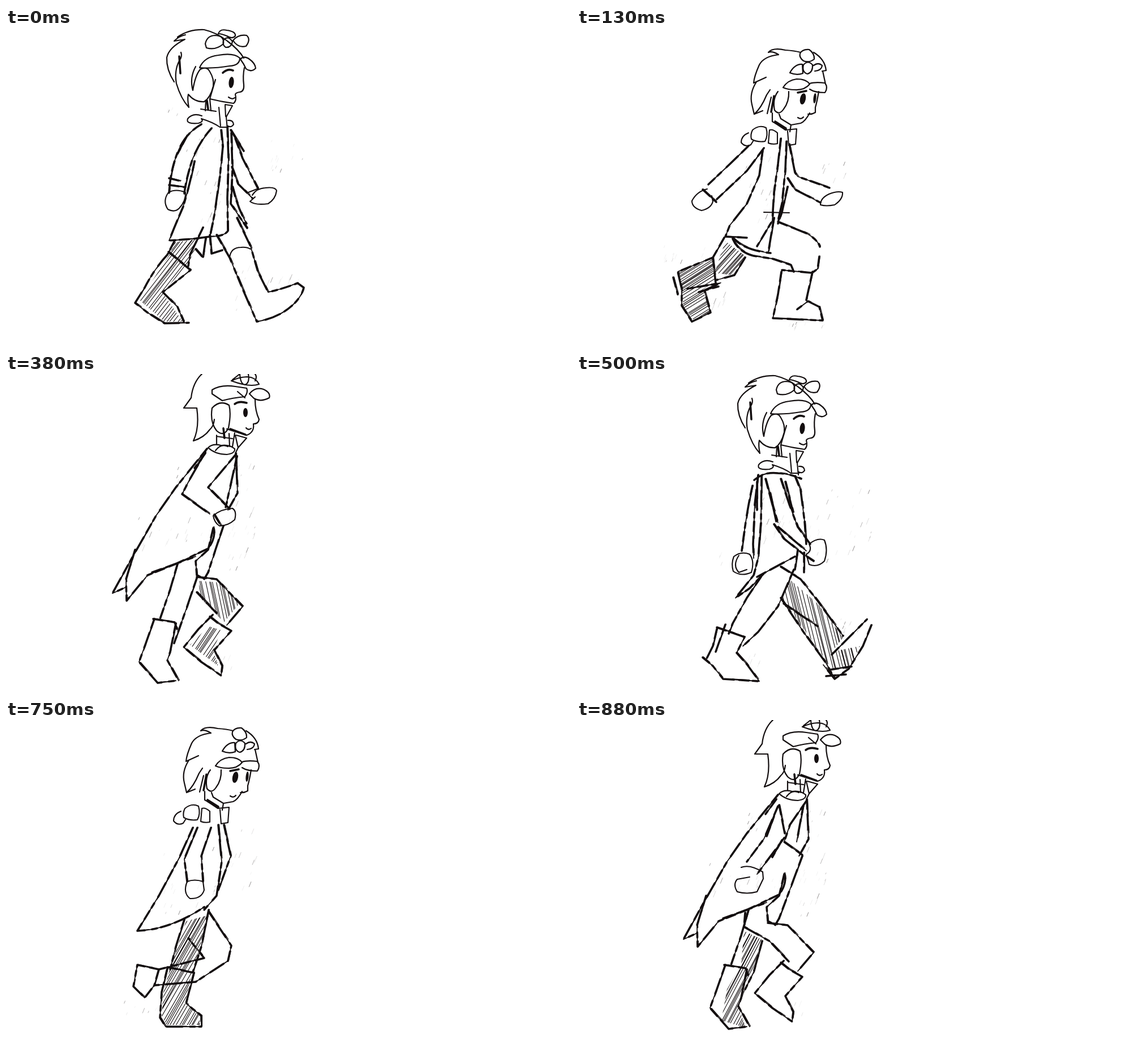
Write an HTML page with a canvas that moves like this. It is 998 px wide and 561 px high and loops after 1 s.

```html
<!DOCTYPE html>
<html lang="en">
<head>
<meta charset="utf-8">
<title>Walk cycle</title>
<style>
html, body { margin: 0; width: 100%; height: 100%; overflow: hidden; background: #fff; }
canvas { display: block; }
</style>
</head>
<body>
<canvas id="stage" width="998" height="561"></canvas>
<script>
const ctx = document.getElementById('stage').getContext('2d');
const INK = '#130e0f';
const STARTS = [0, 130, 250, 380, 500, 630, 750, 880];
const LOOP = 1000;

// Heads: clean outlines, thick brows, eyes as [x, y, rx, ry, tilt]
const tallHead = {
  hair: `M317,12Q306,14 297,23L316,20Q288,34 284,52Q283,73 297,95M303,16Q323,2 350,3Q372,8 391,23Q411,38 420,53
    M309,43Q312,50 306,58Q297,75 301,98Q309,125 323,140Q320,126 322,117Q333,131 350,130
    M342,70Q350,51 375,48Q402,43 413,53Q413,66 395,67Q365,72 342,70M414,55Q420,48 430,55Q440,62 441,71Q433,79 424,72Q420,63 414,55
    M335,68Q324,88 330,110Q334,84 343,73Q355,67 360,77Q368,90 366,103Q361,123 350,130`,
  flower: `M352,28Q355,13 370,13Q386,14 384,28Q370,40 354,35ZM384,22Q392,12 400,24Q398,35 388,34Q382,30 384,22
    M401,22Q410,11 425,13Q433,20 424,32Q410,36 401,22M375,10Q378,1 390,4Q406,6 405,14Q400,20 390,14Q380,10 375,10`,
  face: `M421,70Q418,85 420,100Q421,112 413,113Q406,114 405,117Q408,128 402,133Q380,130 360,125M393,122Q400,127 404,123
    M360,125L362,146M353,128L352,146M344,143L371,147M370,91L360,125`,
  brow: 'M383,79Q392,71 401,75M306,50L308,80M355,128L357,143',
  eyes: [[398, 96, 4.5, 10, .1]]
};
const lowHead = {
  hair: `M356,47Q345,40 338,43Q346,34 368,39Q384,40 395,43M418,43Q438,55 440,75L433,76M434,76L439,99
    M356,47Q330,50 322,65Q313,85 312,97L334,87M317,95Q304,115 309,135L313,152Q325,142 335,118L341,109M313,152L328,146M343,122L336,151
    M364,105Q372,92 388,90Q405,90 411,99Q402,110 385,109Q373,109 364,105M411,98Q420,95 438,97Q444,105 438,114Q420,114 411,108
    M355,112Q345,125 349,145Q357,155 365,143Q375,130 374,112`,
  flower: `M394,45Q398,37 410,38Q420,45 419,55Q410,62 400,58Q392,52 394,45M400,65Q408,56 416,65Q417,78 407,81Q397,78 400,65
    M376,79Q385,63 398,64L399,80Q388,84 376,79M418,66Q426,60 433,66Q432,75 420,76`,
  face: `M427,112Q424,130 421,140L421,149Q414,153 408,152M390,158Q396,162 400,157M411,150Q403,165 395,168L378,171L360,160L357,152
    M345,150L345,165L370,179M378,171L376,183`,
  brow: 'M390,114L405,111M348,120L343,148M350,165L369,177',
  eyes: [[399, 125, 5, 10, .2], [420, 124, 2.5, 9, .1]]
};
const highHead = {
  hair: `M346,0Q330,15 327,42L314,60L337,60Q342,95 331,118Q350,112 360,98Q367,92 368,80
    M364,28Q380,18 405,22L425,25Q428,32 422,40Q400,42 382,47L364,35ZM430,35Q440,22 455,27Q468,33 465,42Q450,50 438,43Z
    M364,60Q360,85 372,100Q385,112 393,95Q398,70 394,55Q378,45 364,60M409,31L422,42`,
  flower: 'M398,12Q410,6 425,5Q440,5 447,18Q430,24 398,12M413,0Q414,18 422,19Q431,16 428,0M400,10L413,0M440,0Q444,5 440,12',
  face: `M440,45Q440,65 447,80Q446,88 437,88Q439,103 425,108L390,97M424,95Q428,100 433,96
    M384,95L385,113M394,105L395,128M372,108L372,125M404,104L400,128M372,110L400,114M407,108L425,113L410,130L405,140M410,130L405,108
    M357,130Q365,122 380,126Q395,124 404,132Q405,140 390,142Q370,142 357,130M370,135Q380,122 392,128`,
  brow: 'M404,53Q412,47 425,51M384,96L386,113M396,97L423,107',
  eyes: [[423, 68, 4, 8, 0]]
};

// Shared clothing and limbs
const tallCollar = `M387,135L400,137L389,157L391,178M387,136L388,156M376,140L379,173M346,155Q330,149 321,160Q317,170 340,168Q350,165 345,160
  Q365,166 378,175L392,175M392,163Q401,162 402,170Q398,177 390,172`;
const lowCollar = `M303,185Q290,190 290,202Q297,211 307,206L312,198M310,180Q322,170 334,176Q338,190 332,200Q318,202 308,196Q306,188 310,180
  M340,180L338,203Q346,206 354,204L354,185Q346,178 340,180M350,168L368,180L388,178L386,205L374,207L372,182`;
const cape = `M355,132L300,200L265,250L225,320L188,387L212,376M228,310L212,362L213,400L250,355L300,335L357,308Q372,288 366,270
  M258,350L335,322M406,140L409,210L392,240M352,140L333,166`;
const highLegs = `M303,335L290,380L272,432M260,432L298,438L302,450M262,432L247,475L235,508L268,545L300,541M300,440L290,490L285,505L305,541
  M337,358L372,362L418,410L390,443M360,428L375,440L398,453L368,487M365,425L340,450L314,482L345,508L380,532L382,515L368,487
  M366,272L357,310L335,330L337,355L350,362L357,350`;
const passLegs = `M315,352L300,400L290,440M358,335L345,400L330,445M285,436L332,446M285,438L275,480L272,525L282,541L345,541M332,446L318,500L345,522L345,541
  M358,338L398,398L392,425L335,462L262,468L245,490L225,470L232,432L270,440L350,420L322,385M270,440L262,468`;
const passCoat = `M330,190L305,245L270,310L232,372Q290,370 350,330M375,185L381,250L372,310L350,335M385,185L397,240L375,300`;
const passSleeve = 'M338,190L315,245L320,285M362,190L345,240L348,285';
const passHand = 'M320,285Q312,305 325,315Q345,316 350,300L348,285Q333,280 320,285';
const highSmudge = [[395, 155, 45, 190, 28], [235, 240, 120, 90, 16], [300, 150, 20, 50, 6], [370, 490, 30, 30, 4]];

// head + offset, clean lines, rough lines, hatched areas [polygon, angle, gap], smudges [x, y, w, h, count]
const poses = [
  {
    head: tallHead,
    line: [tallCollar, `M287,290Q276,305 286,320Q298,326 306,318Q318,305 317,290Q300,283 287,290
      M435,295Q442,283 458,282Q476,280 478,287Q476,302 463,310Q440,313 431,306L440,298M428,290L446,283M395,405Q397,387 415,387Q425,386 432,390`],
    rough: [`M345,170Q318,185 305,215Q290,250 288,292M363,177Q342,200 330,230Q318,265 315,292M288,265L308,270M288,277L317,281
      M333,235Q325,275 313,315Q300,345 288,375L330,372L360,368Q385,368 392,358M380,180L383,210L378,260L368,330L361,364M391,175L393,230L391,300L392,358
      M398,185L400,250L397,310L426,353M400,280Q410,320 425,345M397,180L420,217M405,195L418,230L445,283M399,245L410,275L435,300M320,190L303,222`,
      `M298,375L285,400Q262,425 245,458L228,485L250,502L280,521L323,520M348,352L325,400L322,420M287,395L326,427L277,466L303,492L314,518
      M372,365L395,405L420,465L443,518M408,335L432,385L445,430L463,466Q490,460 515,450L526,458Q522,475 505,490Q480,512 443,518
      M335,390L348,405L353,370M360,365L363,398L382,392`],
    hatch: [['298,378 343,372 320,420 276,466 312,518 280,518 236,480 290,398', -52, 5]],
    smudge: [[470, 190, 55, 60, 12], [320, 190, 60, 170, 22], [460, 432, 60, 18, 9], [285, 130, 20, 25, 4], [400, 400, 35, 100, 8]]
  },
  {
    head: lowHead,
    line: [lowCollar, `M230,284Q212,288 203,305Q203,317 220,322Q237,318 240,306L238,296
      M430,312Q430,300 445,293Q460,287 469,290Q470,302 455,312Q440,315 430,312M330,325L375,326`],
    rough: [`M303,208L270,240L232,276M330,212L300,252L247,302M222,285L246,307M328,215L322,260L300,310L270,348L262,368L300,370
      M275,370Q295,392 342,397M360,195L355,240L348,290L345,340L318,385M370,200L368,250L362,310L355,340M348,335L338,395
      M375,205L385,255L390,262L446,282M372,265L385,285L430,308M372,280L362,325L355,345`,
      `M355,342Q380,352 405,362Q425,373 429,386M275,372Q285,395 312,402L345,407L378,418L383,430M428,403L425,425L415,432L362,427
      M361,430L355,470L346,512L434,516L428,492L408,482L388,497M416,430L405,480M260,370L240,405L178,430L185,460L185,490L203,518L236,502L225,463L253,450L195,460
      M297,405L278,436L245,445M240,405L245,450M170,440L178,470M215,466L250,456`],
    hatch: [['262,376 297,402 275,436 243,432', -48, 5], ['178,432 240,407 245,445 222,462 236,502 205,514 188,490', -32, 5]],
    smudge: [[155, 380, 100, 30, 12], [420, 235, 55, 35, 7], [300, 225, 50, 130, 16], [240, 460, 30, 40, 7], [370, 515, 70, 12, 8]]
  },
  {
    head: lowHead, dx: 6, dy: -24,
    shifted: lowCollar,
    line: [passHand],
    rough: [passCoat, passSleeve, passLegs],
    hatch: [['355,345 395,400 388,424 335,460 262,466 245,487 228,470 234,435 270,442 350,421 325,388', -50, 5]],
    smudge: [[280, 220, 90, 120, 18], [400, 190, 45, 120, 10], [210, 490, 60, 40, 6]]
  },
  {
    head: highHead,
    line: ['M366,250Q380,238 400,237Q408,242 404,257Q392,268 377,268Q368,262 366,250'],
    rough: [cape, highLegs, `M352,138L325,185L311,212L360,247M405,143L357,200L395,238M408,145L388,235M368,248L380,268M384,268L370,310L357,350
      M337,360L320,410L297,475M337,385L372,422`],
    hatch: [['342,365 378,368 412,405 385,438 340,392', 78, 6], ['358,445 380,452 366,488 375,515 325,478', -56, 6]],
    smudge: highSmudge
  },
  {
    head: tallHead,
    line: [tallCollar, `M277,322Q290,312 305,318Q314,330 308,350Q290,358 276,348Q272,335 277,322M286,320Q274,338 286,350L300,345
      M410,300Q425,288 437,293Q444,310 437,330Q425,342 410,336L405,318Q416,312 410,300`],
    rough: [`M313,187Q330,172 355,175Q378,176 396,185M310,197Q300,240 291,312M320,178L314,230L311,300L312,325M326,180L325,260L320,325L312,355L280,395L305,378L330,352
      M318,358L385,322M333,185L345,230L355,262M341,210L352,260M360,185L375,230L390,270L412,300M348,265L365,290L400,318L418,330M355,270L405,312
      M385,180L395,205L402,260L405,300M390,310L385,345M401,315L401,350M368,190L382,245M318,190L318,240`,
      `M325,358L300,395L275,440L268,458M383,345L355,410L320,455L293,480M247,447L270,455L296,464L282,492L300,512L322,542L258,538L240,515L222,500
      M247,450L240,480L229,502M262,442L245,490M360,340L395,362L425,400L470,462M360,395L400,455L440,510L455,537M365,405L425,445
      M450,495L470,475L512,433M520,443L505,480L480,520L455,538L435,513M440,533L475,530M445,522L485,516`],
    hatch: [['375,362 425,405 470,465 450,490 500,480 480,520 450,520 362,395', 76, 6]],
    smudge: [[410, 200, 110, 130, 28], [330, 200, 50, 130, 16], [465, 430, 35, 25, 8], [245, 310, 12, 25, 3], [300, 480, 25, 40, 5]]
  },
  {
    head: lowHead, dy: -4,
    line: [`M312,172Q325,165 335,175L340,195Q320,195 308,192Q303,182 312,172M337,178L337,200L355,202L352,180Q345,172 337,178
      M355,180L393,188L392,206L372,203L375,184M386,176L384,203
      M418,330Q425,317 440,318L467,317Q472,330 463,344L425,347Q417,342 418,330`],
    rough: [`M318,205L285,215L265,245L247,270L246,300L251,335M322,213L290,245L267,280L270,305M328,205L315,250L290,290L262,340L235,385L210,403Q270,395 305,380Q335,365 347,345
      M358,270L355,310L345,350L378,395M380,305L375,345L362,382M330,205L345,245L362,282M365,205L385,250L415,285L452,317M365,270L390,310L425,345
      M322,205L312,240M360,285L350,340M270,285L255,330M377,210L380,240`,
      `M215,400L185,440L146,507L180,547L225,548L215,520L200,492L215,465Q250,455 290,425Q325,395 347,365M187,442Q205,440 216,462M195,425L165,470
      M320,410L365,440L362,490L358,533M355,375L390,405L415,440L413,505L430,508L440,525L443,543L357,535M416,508L428,538`],
    hatch: [['335,400 355,382 380,400 413,440 412,505 430,538 360,535 366,440', -66, 6]],
    smudge: [[114, 405, 90, 75, 18], [200, 245, 60, 60, 12], [400, 228, 65, 65, 14], [425, 450, 45, 70, 9], [290, 230, 60, 130, 20], [215, 470, 25, 70, 6]]
  },
  {
    head: lowHead, dx: 6, dy: -24,
    shifted: lowCollar,
    line: [passHand],
    rough: [passCoat, passSleeve, passLegs],
    hatch: [['318,355 355,345 343,400 328,447 316,500 342,522 342,538 284,538 275,522 278,480 290,438', -60, 5]],
    smudge: [[280, 220, 90, 120, 18], [400, 190, 45, 120, 10], [210, 490, 60, 40, 6]]
  },
  {
    head: highHead,
    line: ['M290,260Q305,254 328,268L329,280L318,303Q300,308 283,303Q275,290 283,281L305,277'],
    rough: [cape, highLegs, `M357,150L367,200M355,152L330,210L300,250M366,208L318,272M362,212L345,242M405,143L376,185L366,215L398,238M400,150L388,215
      M398,240L372,310L357,350M297,340L295,365L340,390L374,426M327,390L312,445L297,475M335,205L348,170`],
    hatch: [['295,372 328,388 300,470 285,505 298,543 255,530 265,475 290,432', -62, 5]],
    smudge: highSmudge
  }
];

let seed = 1;
const random = () => (seed = seed * 16807 % 2147483647) / 2147483647;

function stroke(d, width, dash = []) {
  ctx.lineWidth = width;
  ctx.setLineDash(dash);
  ctx.stroke(new Path2D(d));
}

// A thin line with uneven heavier dashes over it
function roughStroke(d) {
  stroke(d, 1.8);
  stroke(d, 3.6, [17, 9, 28, 13, 9, 7]);
  ctx.save();
  ctx.translate(1.5, -1);
  stroke(d, 1.2, [31, 17, 12, 23]);
  ctx.restore();
}

function hatch([points, angle, gap]) {
  const xy = points.split(/[ ,]/).map(Number);
  ctx.save();
  ctx.clip(new Path2D(`M${points}Z`));
  ctx.translate((xy[0] + xy[xy.length / 2 | 0]) / 2, 440);
  ctx.rotate(angle * Math.PI / 180);
  ctx.beginPath();
  for (let y = -200; y < 200; y += gap) {
    ctx.moveTo(-200, y + random() * 3);
    ctx.lineTo(200, y + random() * 3);
    if (random() < .4) ctx.lineTo(-200, y + gap);
  }
  ctx.lineWidth = 1.1;
  ctx.setLineDash([]);
  ctx.stroke();
  ctx.restore();
}

function smudge([x, y, w, h, count]) {
  ctx.setLineDash([]);
  for (let i = 0; i < count; i++) {
    const px = x + random() * w, py = y + random() * h, length = 2 + random() * 9;
    ctx.strokeStyle = `rgba(60,55,55,${.06 + random() ** 3 * .5})`;
    ctx.lineWidth = 1;
    ctx.beginPath();
    ctx.moveTo(px, py);
    ctx.lineTo(px - length * .4, py + length);
    ctx.stroke();
  }
}

function drawHead({ hair, flower, face, brow, eyes }) {
  [hair, flower, face].forEach(d => stroke(d, 2.2));
  stroke(brow, 3.6);
  for (const [x, y, rx, ry, tilt] of eyes) {
    ctx.beginPath();
    ctx.ellipse(x, y, rx, ry, tilt, 0, 7);
    ctx.fill();
  }
}

function drawPose({ head, dx = 0, dy = 0, shifted, line, rough, hatch: areas, smudge: marks }) {
  seed = 77;
  ctx.fillStyle = '#fff';
  ctx.fillRect(0, 0, 998, 561);
  marks.forEach(smudge);
  ctx.strokeStyle = ctx.fillStyle = INK;
  ctx.lineCap = ctx.lineJoin = 'round';
  areas.forEach(hatch);
  rough.forEach(roughStroke);
  line.forEach(d => stroke(d, 2.1));
  ctx.save();
  ctx.translate(dx, dy);
  drawHead(head);
  if (shifted) stroke(shifted, 2.1);
  ctx.restore();
}

let shown = -1;
function tick() {
  const time = performance.now() % LOOP;
  const index = STARTS.findLastIndex(start => start <= time);
  if (index !== shown) drawPose(poses[shown = index]);
  requestAnimationFrame(tick);
}
tick();
</script>
</body>
</html>
```
